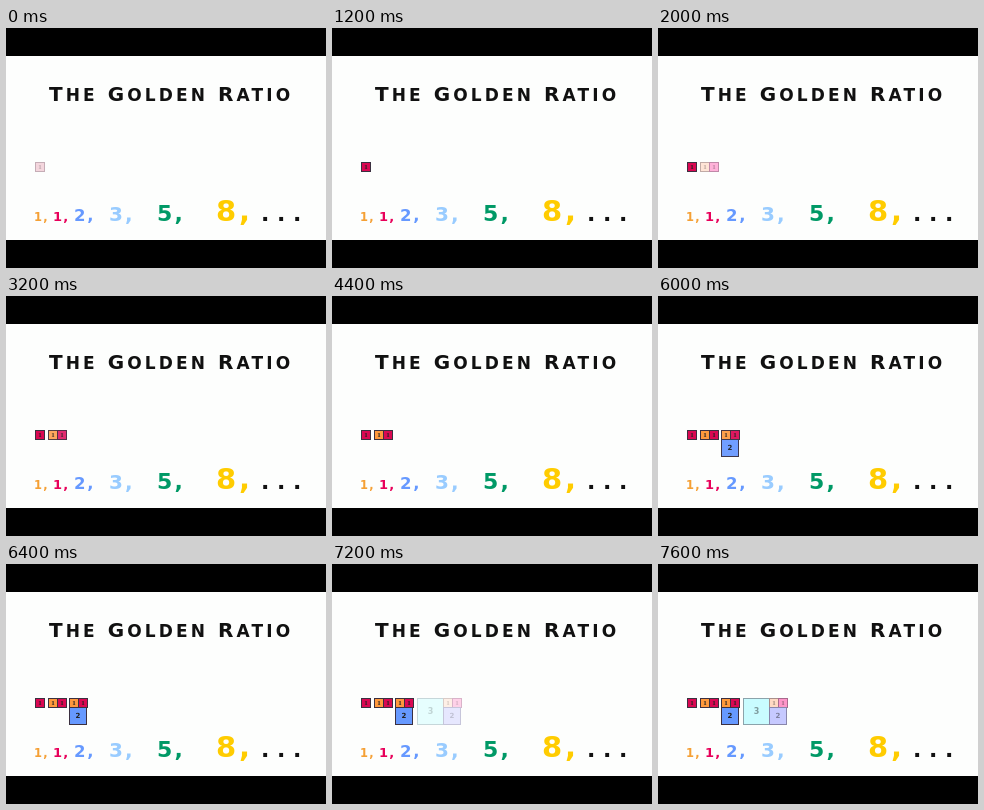
An HTML page with a canvas that plays this animation: 320x240 px, repeating every 8 s.

```html
<!DOCTYPE html>
<html lang="en">
<head>
<meta charset="utf-8">
<title>The Golden Ratio</title>
<style>
html, body { margin: 0; width: 100%; height: 100%; overflow: hidden; background: #000; }
canvas { display: block; width: 320px; height: 240px; }
</style>
</head>
<body>
<canvas id="stage" width="320" height="240"></canvas>
<script>
const ctx = document.getElementById('stage').getContext('2d');
const LOOP = 8000, STEP = 400;
const SANS = '"DejaVu Sans", sans-serif';
const SERIF = '"Liberation Serif", serif';

// Each tone runs from white through a pale tint to its full colour.
const TONES = {
  first:  [[239, 190, 202], [218, 8, 82]],
  red:    [[255, 158, 208], [218, 8, 82]],
  orange: [[255, 221, 204], [255, 153, 60]],
  blue:   [[204, 204, 255], [102, 153, 255]],
  cyan:   [[204, 255, 255], [153, 204, 255]]
};
const PAPER = [253, 254, 253];
const PALE_AT = 0.4;

const pair = (x, y) => [
  { x, y, size: 9, label: 1, tone: 'orange' },
  { x: x + 9, y, size: 9, label: 1, tone: 'red' }
];
const block = x => [
  ...pair(x, 134),
  { x, y: 143, size: 17, label: 2, tone: 'blue' }
];

const groups = [
  { start: -400, fade: 1600, squares: [{ x: 29, y: 134, size: 9, label: 1, tone: 'first' }] },
  { start: 1300, fade: 2200, squares: pair(42, 134) },
  { start: 4500, fade: 1600, squares: block(63) },
  { start: 6900, fade: 1600, squares: [
    { x: 85, y: 134, size: 26, label: 3, tone: 'cyan' },
    ...block(111)
  ] }
];

const sequence = [
  ['1,', 28, 11.5, '#f5a035'],
  ['1,', 47, 13, '#e8005a'],
  ['2,', 68, 16.5, '#6699ff'],
  ['3,', 103, 20, '#99ccff'],
  ['5,', 151, 22, '#009966'],
  ['8,', 210, 29, '#ffcc00']
];

function mix(a, b, k) {
  return a.map((v, i) => Math.round(v + (b[i] - v) * k));
}

function tint(tone, k) {
  const [pale, full] = TONES[tone];
  const c = k < PALE_AT
    ? mix(PAPER, pale, k / PALE_AT)
    : mix(pale, full, (k - PALE_AT) / (1 - PALE_AT));
  return `rgb(${c})`;
}

function write(text, x, y, size, color, spacing = 0, family = SANS) {
  ctx.font = `bold ${size}px ${family}`;
  ctx.letterSpacing = `${spacing}px`;
  ctx.fillStyle = color;
  ctx.fillText(text, x, y);
  return x + ctx.measureText(text).width;
}

function drawTitle() {
  let x = 43;
  for (const word of ['THE', 'GOLDEN', 'RATIO']) {
    x = write(word[0], x, 73, 20, '#111', 3.1);
    x = write(word.slice(1) + ' ', x, 73, 17, '#111', 3.1) + 1;
  }
}

function drawSequence() {
  for (const [text, x, size, color] of sequence) {
    write(text, x, 193, size, color, size * 0.1);
  }
  for (const x of [255, 271, 287]) write('.', x, 193, 22, '#111');
}

function drawSquare({ x, y, size, label, tone }, k) {
  ctx.fillStyle = tint(tone, k);
  ctx.fillRect(x, y, size + 1, size + 1);
  ctx.globalAlpha = k;
  ctx.strokeStyle = '#3b3040';
  ctx.lineWidth = 1;
  ctx.strokeRect(x + 0.5, y + 0.5, size, size);
  ctx.textAlign = 'center';
  const [fontSize, family] = label === 1 ? [7, SERIF] : [label + 5, SANS];
  write(label, x + size / 2 + 0.5, y + size / 2 + 0.5 + fontSize * 0.35, fontSize, '#222', 0, family);
  ctx.textAlign = 'left';
  ctx.globalAlpha = 1;
}

function draw(now) {
  let t = Math.floor((now % LOOP) / STEP) * STEP;
  if (t > 3200 && t < 4400) t = 3200;

  ctx.fillStyle = '#000';
  ctx.fillRect(0, 0, 320, 240);
  ctx.fillStyle = `rgb(${PAPER})`;
  ctx.fillRect(0, 28, 320, 184);
  drawTitle();
  drawSequence();

  for (const { start, fade, squares } of groups) {
    const k = Math.min(1, (t - start) / fade);
    if (k > 0) squares.forEach(square => drawSquare(square, k));
  }
}

let began;
function tick(now) {
  began ??= now;
  draw(now - began);
  requestAnimationFrame(tick);
}
draw(0);
requestAnimationFrame(tick);
</script>
</body>
</html>
```
